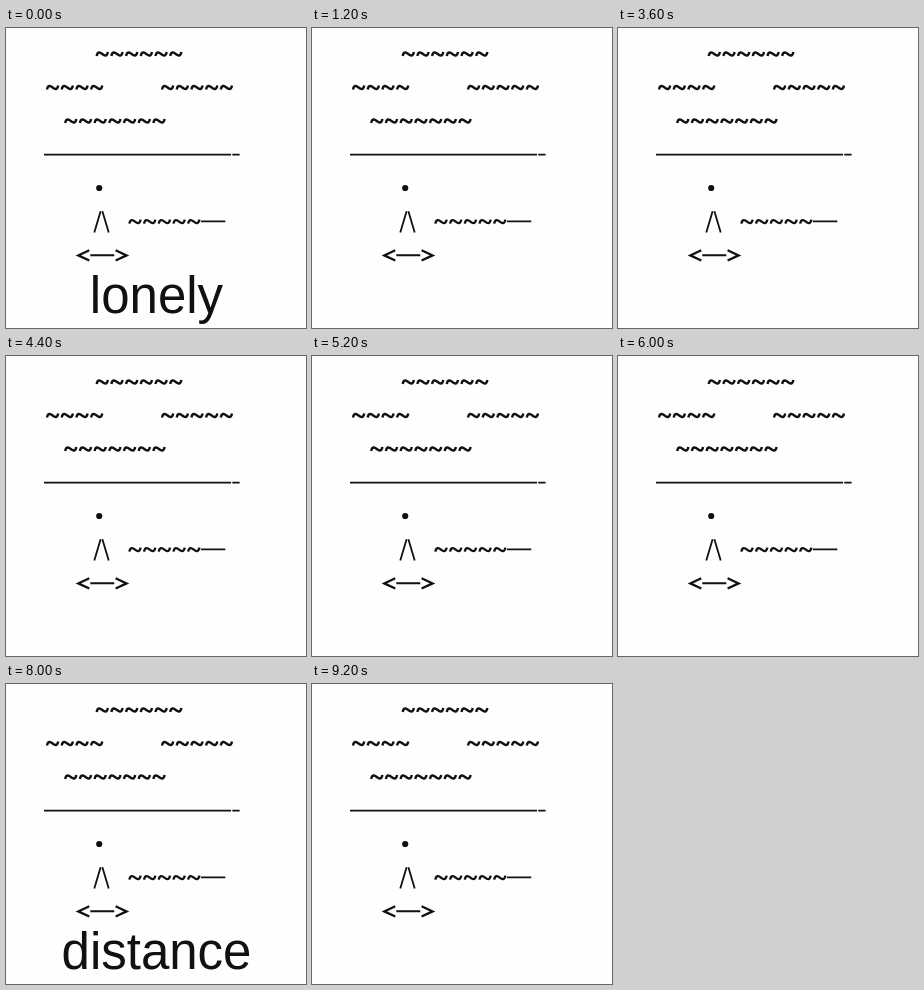
Write an HTML page that moves like this. It is 300 px wide and 300 px high and loops after 9.6 s.

```html
<!DOCTYPE html>
<html lang="en">
<head>
<meta charset="utf-8">
<title>Lonely surfer</title>
<style>
  html, body { margin: 0; width: 100%; height: 100%; overflow: hidden; background: #fefefe; }
  svg { display: block; width: 100vw; height: 100vh; }
  text { font: 51px "Liberation Sans", Arial, sans-serif; fill: #111; }
  path { fill: none; stroke: #111; }
</style>
</head>
<body>
<svg viewBox="0 0 300 300">
  <path id="waves" stroke-width="2.4"/>
  <path stroke-width="1.9" d="M38 126.6H225M226.3 126.6H233.6M195 193.4H219.3M84.3 227.2H108.3"/>
  <path stroke-width="2.3" d="M83.3 222.3L72.3 227.4L83.3 232.5M109.6 222.3L120.6 227.4L109.6 232.5"/>
  <path stroke-width="1.8" d="M88.3 204.5L94.6 183.3M96.4 183.3L102.7 204.5"/>
  <circle cx="93.2" cy="160" r="3.1" fill="#111"/>
  <text id="word" x="150.5" y="284.8" text-anchor="middle"></text>
</svg>
<script>
  const SLOT = 400;
  const WORDS = "lonely surfer looking out over the sea and into the distance .".split(" ");
  const PITCH = 14.7;
  // first centre x, centre y, count
  const ROWS = [
    [96.3, 26, 6], [46.6, 59.5, 4], [161.6, 59.5, 5], [64.8, 93, 7], [129, 193.6, 5]
  ];

  const tilde = (x, y) => `M${x - 5.6} ${y + 2}c.8-4.6 3.2-4 5.6-2s4.8 2.6 5.6-2`;
  const row = ([x, y, n]) =>
    Array.from({ length: n }, (_, i) => tilde(x + i * PITCH, y)).join("");
  document.getElementById("waves").setAttribute("d", ROWS.map(row).join(""));

  const word = document.getElementById("word");

  // each word shows for one slot, then one blank slot
  function draw(ms) {
    const slot = Math.floor(ms / SLOT) % (WORDS.length * 2);
    const next = slot % 2 ? "" : WORDS[slot / 2];
    if (word.textContent !== next) word.textContent = next;
  }

  const start = performance.now();
  function tick() {
    draw(performance.now() - start);
    requestAnimationFrame(tick);
  }
  tick();
</script>
</body>
</html>
```
